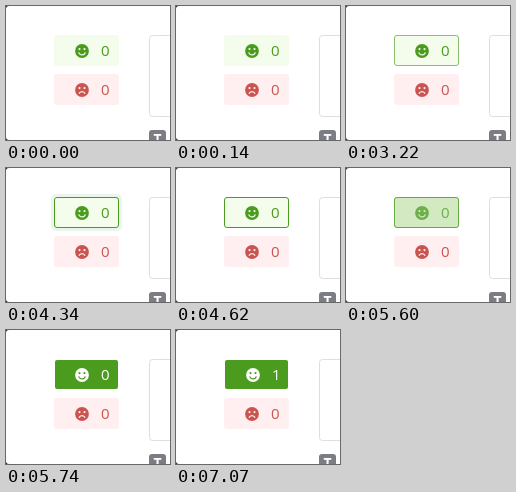
Recreate the animation shown at these times as an HTML page with a canvas. Size 164 by 134 pixels, loop 8000 ms.

```html
<!DOCTYPE html>
<html lang="en">
<head>
<meta charset="utf-8">
<title>Vote buttons</title>
<style>
html, body { margin: 0; width: 100%; height: 100%; overflow: hidden; background: #fff; }
canvas { display: block; width: 164px; height: 134px; }
</style>
</head>
<body>
<canvas id="stage" width="164" height="134"></canvas>
<script>
const ctx = document.getElementById('stage').getContext('2d');
const LOOP = 8000;
const WHITE = [255, 255, 255];
const GREEN = [74, 155, 30], PALE_GREEN = [244, 252, 235];
const RED = [201, 84, 80], PALE_RED = [255, 239, 240];

const mix = (a, b, p) => a.map((v, i) => v + (b[i] - v) * p);
const css = (c, alpha = 1) => `rgba(${c.map(Math.round).join(',')},${alpha})`;

// Value of the last [time, value] step that has been reached.
const stepAt = (steps, t) => steps.reduce((v, [at, next]) => t >= at ? next : v, 0);

const HOVER = [[3080, 0.6], [3150, 0.85], [3220, 1]];
const FOCUS = [[4340, 0.65], [4410, 1], [4550, 0.4], [4620, 0]];
const DARKEN = [[4340, 1]];
const FILL = [[5600, 0.2], [5670, 0.6], [5740, 1]];

function box(x, y, w, h, r, fill) {
  ctx.beginPath();
  ctx.roundRect(x, y, w, h, r);
  if (fill) {
    ctx.fillStyle = fill;
    ctx.fill();
  }
}

function outline(x, y, w, h, r, color) {
  box(x + 0.5, y + 0.5, w - 1, h - 1, r);
  ctx.strokeStyle = color;
  ctx.lineWidth = 1;
  ctx.stroke();
}

function dot(x, y, r, color) {
  ctx.beginPath();
  ctx.arc(x, y, r, 0, Math.PI * 2);
  ctx.fillStyle = color;
  ctx.fill();
}

function face(x, y, color, detail, happy) {
  dot(x, y, 6.9, color);
  dot(x - 2.5, y - 1.9, 1.1, detail);
  dot(x + 2.5, y - 1.9, 1.1, detail);
  ctx.beginPath();
  if (happy) ctx.arc(x, y + 0.4, 3.5, 0.3, Math.PI - 0.3);
  else ctx.arc(x, y + 5, 3.3, Math.PI + 0.4, -0.4);
  ctx.strokeStyle = detail;
  ctx.lineWidth = 1.2;
  ctx.stroke();
}

function label(text, x, y, color, font) {
  ctx.font = font;
  ctx.textAlign = 'center';
  ctx.textBaseline = 'alphabetic';
  ctx.fillStyle = color;
  ctx.fillText(text, x, y);
}

const count = (text, x, y, color) =>
  label(text, x, y, color, '15px "Open Sans", "Noto Sans", sans-serif');

function likeButton(t) {
  const hover = stepAt(HOVER, t), focus = stepAt(FOCUS, t);
  const fill = stepAt(FILL, t), voted = t >= 7070;
  const ground = mix(PALE_GREEN, GREEN, fill);
  const ink = css(mix(GREEN, WHITE, fill));

  if (focus) box(45, 26, 71, 37, 5, css([211, 235, 220], focus * 0.75));
  if (fill === 1) {
    box(49, 30, 63, 29, 2, css(ground));
  } else {
    box(48, 29, 65, 31, 3, css(ground));
    if (hover) {
      const strong = stepAt(DARKEN, t);
      const edge = mix([139, 190, 110], GREEN, strong);
      outline(48, 29, 65, 31, 2.5, css(mix(edge, ground, fill), hover));
    }
  }
  face(voted ? 77 : 76, 45, ink, css(ground), true);
  count(voted ? '1' : '0', voted ? 100.2 : 99.2, 50, ink);
}

function draw(t) {
  ctx.fillStyle = '#222';
  ctx.fillRect(0, 0, 164, 134);
  box(0, 0, 164, 134, [3, 0, 0, 3], '#fff');

  outline(143, 29, 40, 82, 3, '#dedede');
  box(143, 124, 17, 17, 3, '#7b7d82');
  label('T', 151.5, 138, '#fff', 'bold 14px "Open Sans", "Noto Sans", sans-serif');

  box(48, 68, 65, 31, 3, css(PALE_RED));
  face(76, 84, css(RED), css(PALE_RED), false);
  count('0', 99.2, 89, css(RED));

  likeButton(t);
}

const start = performance.now();
function tick() {
  draw((performance.now() - start) % LOOP);
  requestAnimationFrame(tick);
}
tick();
</script>
</body>
</html>
```
